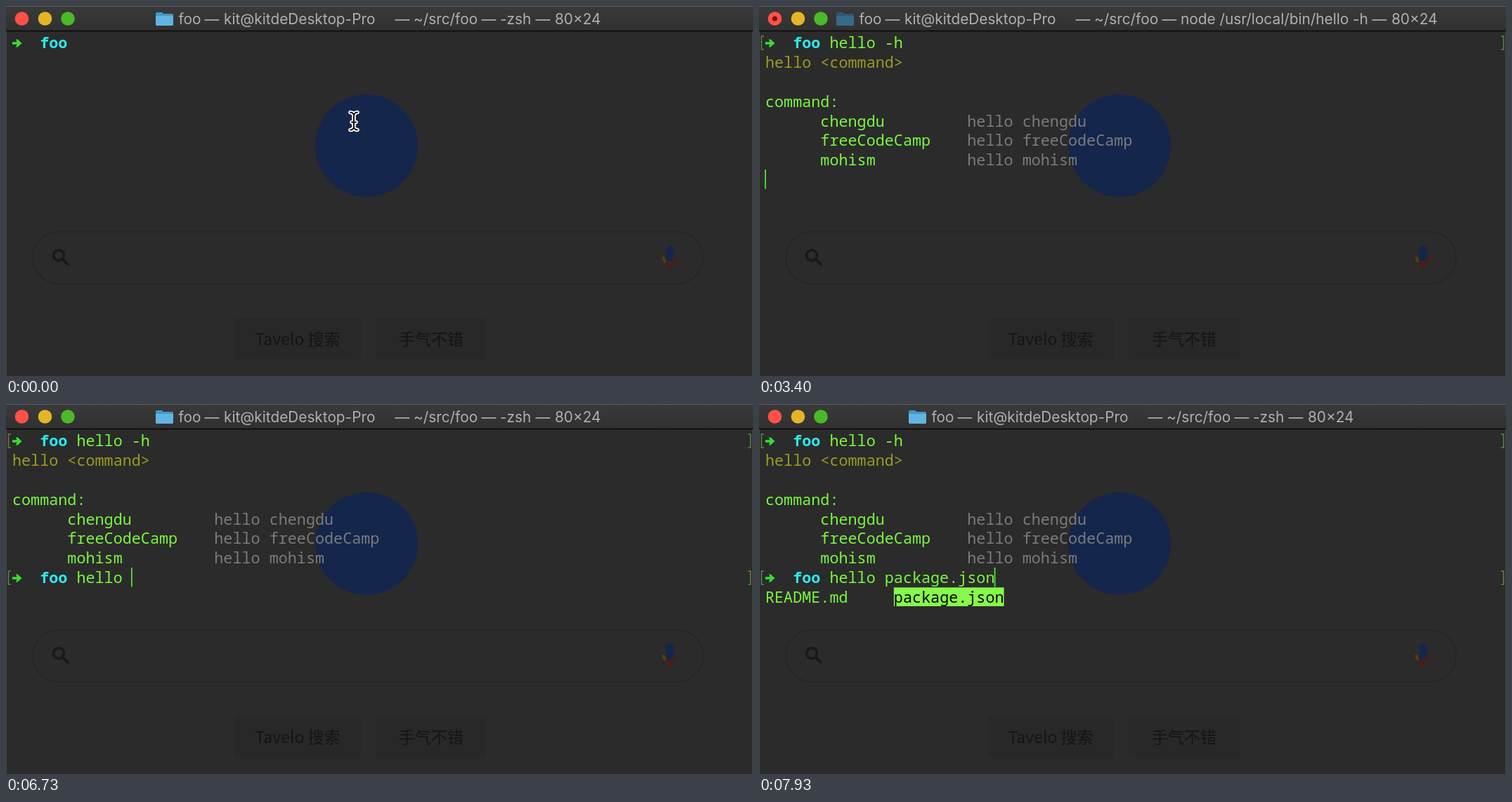
These frames come from a looping animation (1063 px wide and 527 px high, 8000 ms). An HTML page:

```html
<!DOCTYPE html>
<html lang="zh">
<head>
<meta charset="utf-8">
<title>Terminal</title>
<style>
html, body { margin: 0; width: 100%; height: 100%; overflow: hidden; background: #2b2b2b; }
svg { display: block; width: 1063px; height: 527px; }
text { white-space: pre; }
#title { font: 20.8px Inter, sans-serif; fill: #b0b0b0; }
#term { font: 21.77px "Noto Sans Mono", monospace; }
#page text { font: 500 23px "Noto Sans CJK SC", "Noto Sans CJK", sans-serif; fill: #151515; text-anchor: middle; }
</style>
</head>
<body>
<svg viewBox="0 0 1063 527">
  <defs>
    <linearGradient id="bar" x2="0" y2="1">
      <stop stop-color="#3a3a3a"/><stop offset="1" stop-color="#303030"/>
    </linearGradient>
    <filter id="soft" color-interpolation-filters="sRGB"><feGaussianBlur stdDeviation=".7"/></filter>
    <path id="beam" d="M490 151.500q4 0 5 4q1-4 5-4M495 155v17M490 176.500q4 0 5-4q1 4 5 4M492 165.500h6"/>
  </defs>
  <rect width="1063" height="527" fill="#2b2b2b"/>

  <g id="page" filter="url(#soft)">
    <circle cx="513" cy="199" r="73" fill="#14264b"/>
    <rect x="38" y="321.5" width="954" height="74" rx="37" fill="none" stroke="#262626" stroke-width="2"/>
    <g fill="none" stroke="#191919" stroke-width="3.500">
      <circle cx="75" cy="355" r="7.500"/><path d="M80 360l9 9"/>
    </g>
    <rect x="939.500" y="341.500" width="11" height="22" rx="5.500" fill="#13264f"/>
    <g fill="none" stroke-width="3.500">
      <path d="M935.500 357q0 5 3 8" stroke="#54400c"/>
      <path d="M938.500 365q6.500 5 13 0q3-3 3-8" stroke="#501a15"/>
      <path d="M945 367v8" stroke="#501a15"/>
    </g>
    <rect x="325" y="445" width="180" height="58" rx="4" fill="#282828"/>
    <rect x="526" y="445" width="158" height="58" rx="4" fill="#282828"/>
    <text x="415" y="483">Tavelo 搜索</text>
    <text x="605" y="483">手气不错</text>
  </g>

  <g id="term"></g>
  <rect id="flash" y="36" width="1063" height="491" fill="#64f514" opacity="0"/>

  <g id="mouse" fill="none" stroke-linecap="round">
    <use href="#beam" stroke="#fff" stroke-width="5.500"/>
    <use href="#beam" stroke="#111" stroke-width="2"/>
  </g>

  <rect width="1063" height="36" fill="url(#bar)"/>
  <path d="M0 .5h1063" stroke="#606060"/>
  <path d="M0 35.500h1063" stroke="#080808" stroke-width="1.500"/>
  <path d="M.5 36v491M1062.500 36v491" stroke="#454a42"/>
  <circle cx="22.500" cy="18" r="9.800" fill="#ff5148"/>
  <circle id="busy" cx="22.500" cy="18" r="3.500" fill="#7d0d07"/>
  <circle cx="55.500" cy="18" r="9.800" fill="#e4b526"/>
  <circle cx="88" cy="18" r="9.800" fill="#4bb928"/>
  <g id="title"></g>
</svg>

<script>
const LOOP = 8000, COL = 13.06, ROW = 27.85;
const GREEN = '#7af83d', CYAN = '#2fe8ec', GRAY = '#7b7b7b', OLIVE = '#9c9a22';
const RUN = 3000, OUTPUT = 3270, PROMPT = 3530, TAB = 6730, LIST = 6800, FIRST = 7400, SECOND = 7870;

const $ = id => document.getElementById(id);
const show = (id, on) => $(id).setAttribute('visibility', on ? 'visible' : 'hidden');
const colX = c => 9 + c * COL;
const rowY = r => 38.5 + r * ROW;
const esc = s => s.replace(/</g, '&lt;').replace(/>/g, '&gt;');

// Each burst: text, start time, time per key
const bursts = [['hello ', 1070, 140], ['-h', 2270, 170], ['hello ', 5400, 140]];
const typed = ([text, start, gap], t) =>
  t < start ? '' : text.slice(0, Math.floor((t - start) / gap) + 1);
const events = [-600, RUN, OUTPUT, PROMPT, TAB, LIST, FIRST, SECOND]
  .concat(...bursts.map(([s, start, gap]) => [...s].map((_, i) => start + i * gap)));

const put = (row, col, text, fill, weight = 400) =>
  `<text x="${colX(col)}" y="${rowY(row) + 21.7}" fill="${fill}" font-weight="${weight}">${esc(text)}</text>`;

function prompt(row, command, marked) {
  const y = rowY(row) + 14.5;
  const marks = `<path d="M7 ${y - 10}h-3.5v19h3.5M1056 ${y - 10}h3.5v19h-3.5" fill="none" stroke="#5c8348" stroke-width="1.5"/>`;
  return (marked ? marks : '') +
    `<path d="M9 ${y - 1.7}h6.5l-1.5-3.8h2.5l6 5.5l-6 5.5h-2.5l1.5-3.8h-6.5z" fill="#36df2c"/>` +
    put(row, 3, 'foo', CYAN, 700) + put(row, 7, command, GREEN);
}

function choice(col, text, picked) {
  const box = `<rect x="${colX(col)}" y="${rowY(8)}" width="${text.length * COL}" height="26.7" fill="#86f94a"/>`;
  return (picked ? box : '') + put(8, col, text, picked ? '#000' : GREEN);
}

function terminal(t) {
  const first = typed(bursts[0], t) + typed(bursts[1], t);
  const pick = t >= SECOND ? 'package.json' : t >= FIRST ? 'README.md' : '';
  const second = typed(bursts[2], t) + pick;
  let out = prompt(0, first, t >= RUN), row = 0, col = 7 + first.length;
  if (t >= RUN) [row, col] = [1, 0];
  if (t >= OUTPUT) {
    out += put(1, 0, 'hello <command>', OLIVE) + put(3, 0, 'command:', GREEN);
    ['chengdu', 'freeCodeCamp', 'mohism'].forEach((name, i) => {
      out += put(4 + i, 6, name, GREEN) + put(4 + i, 22, 'hello ' + name, GRAY);
    });
    row = 7;
  }
  if (t >= PROMPT) {
    out += prompt(7, second, t >= TAB);
    col = 7 + second.length;
  }
  if (t >= LIST) {
    out += choice(0, 'README.md', pick === 'README.md') +
      choice(14, 'package.json', pick === 'package.json');
  }
  const last = Math.max(...events.filter(e => e <= t));
  if ((t - last) % 1000 < 500) {
    out += `<rect x="${colX(col) - .8}" y="${rowY(row) - .5}" width="1.8" height="27.5" fill="#48e52d"/>`;
  }
  return out;
}

function titleBar(busy) {
  const x = busy ? 110 : 213, end = busy ? 773 : 551;
  const process = busy ? 'node /usr/local/bin/hello -h' : '-zsh';
  const words = [[32.5, 'foo'], [97, 'kit@kitdeDesktop-Pro'], [367, '~/src/foo'],
    [490, process], [end + 17, '80×24']];
  const dashes = [80, 351, 474, end];
  const [back, front] = busy ? ['#2c5a76', '#356a8a'] : ['#4697c6', '#61b5e2'];
  const label = (dx, s, anchor) => `<text x="${x + dx}" y="26" text-anchor="${anchor}">${s}</text>`;
  return `<path d="M${x} 11q0-2 2-2h7l2 2h12q2 0 2 2v13q0 2-2 2h-21q-2 0-2-2z" fill="${back}"/>` +
    `<path d="M${x} 14h25v12q0 2-2 2h-21q-2 0-2-2z" fill="${front}"/>` +
    words.map(([dx, s]) => label(dx, s, 'start')).join('') +
    dashes.map(dx => label(dx, '—', 'middle')).join('');
}

const cache = {};
function fill(id, html) {
  if (cache[id] !== html) $(id).innerHTML = cache[id] = html;
}

function frame() {
  const t = performance.now() % LOOP;
  const busy = t >= RUN + 70 && t < PROMPT;
  const fade = Math.max(0, t - LIST - 60) / 220;
  fill('term', terminal(t));
  fill('title', titleBar(busy));
  show('busy', busy);
  show('mouse', t < bursts[0][1]);
  $('flash').setAttribute('opacity', t < LIST ? 0 : Math.max(0, .165 * (1 - fade)));
  requestAnimationFrame(frame);
}
frame();
</script>
</body>
</html>
```
